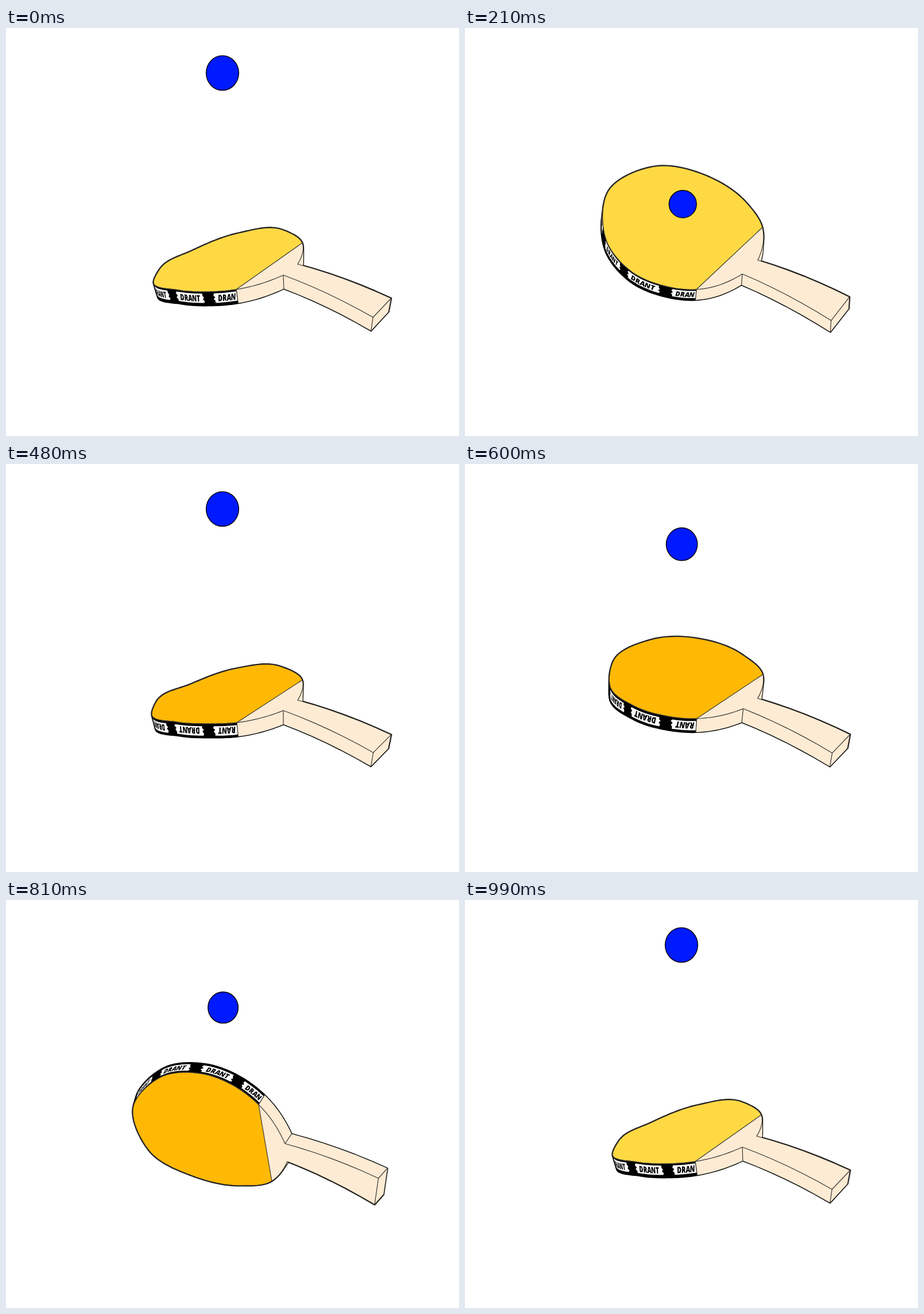
Write an HTML page that moves like this. It is 789 by 710 pixels and loops after 1020 ms.

```html
<!DOCTYPE html>
<html lang="en">
<head>
<meta charset="utf-8">
<title>Paddle flip</title>
<style>
  html, body { margin: 0; width: 100%; height: 100%; overflow: hidden; background: #fff; }
  svg { display: block; width: 100vw; height: 100vh; }
  text { font: italic 800 100px "Open Sans", "Noto Sans", sans-serif; text-anchor: middle; }
</style>
</head>
<body>
<svg id="stage" viewBox="0 0 789 710" stroke-linejoin="round" stroke-linecap="round"></svg>
<script>
const LOOP = 1020, STEP = 30;
const WOOD = '#fdebd4', YELLOW = '#ffd944', ORANGE = '#ffb905', INK = '#3b3630';
const WORD = 'DRANT';

// Each pose: time, turn in degrees, visible side (1 yellow, -1 orange),
// thickness at the tip, blade edge from neck A round the tip to neck B.
const poses = [
  { t: 0, turn: -14.6, side: 1, tip: [8, 24],
    edge: [483,430, 401,455, 352,459, 300,456, 257,444, 268,419, 325,387, 405,357, 481,351, 516,374, 508,411] },
  { t: 210, turn: -4.5, side: 1, tip: [-2, 17],
    edge: [483,428, 403,455, 352,450, 290,424, 247,372, 250,283, 330,241, 420,257, 492,306, 518,347, 510,404] },
  { t: 360, turn: 106.3, side: 1, tip: [5, -22],
    edge: [497,452, 481,470, 425,467, 340,453, 268,430, 226,383, 262,347, 322,345, 380,362, 423,386, 482,433] },
  { t: 480, turn: 163, side: -1, tip: [7, 24],
    edge: [508,411, 516,376, 477,352, 400,356, 322,383, 262,413, 254,437, 298,449, 352,452, 402,450, 483,429] },
  { t: 690, turn: 165.4, side: -1, tip: [-6, 23],
    edge: [511,405, 521,358, 488,314, 415,259, 325,239, 256,280, 254,350, 292,397, 350,427, 405,437, 486,423] },
  { t: 810, turn: 258, side: -1, tip: [5, -16],
    edge: [486,424, 440,356, 400,325, 345,303, 270,308, 222,358, 250,437, 325,480, 410,497, 463,489, 490,455] }
];
poses.push({ ...poses[0], t: 990, turn: 345.4 });

const rad = d => d * Math.PI / 180;
const mix = (a, b, wa, wb) => [a[0] * wa + b[0] * wb, a[1] * wa + b[1] * wb];
const lerp = (a, b, k) => mix(a, b, 1 - k, k);
const add = (a, b, k = 1) => mix(a, b, 1, k);
const sub = (a, b) => add(a, b, -1);
const cross = (a, b) => a[0] * b[1] - a[1] * b[0];

// Handle end: centre, sideways and downward directions
const END = [653, 498.5], ACROSS = [-15.65, 21.4], DOWN = [0, 18.2];
const endWidth = a => mix(ACROSS, DOWN, 2.05 * Math.cos(a), 2.05 * Math.sin(a));
const endDepth = a => mix(ACROSS, DOWN, -Math.sin(a), Math.cos(a));
const depthAt = (x, end, tip) => lerp(end, tip, (653 - x) / 420);

for (const p of poses) {
  p.a = rad(p.turn);
  p.tipDepth = p.tip.map(v => v * p.side);
  p.mid = [];
  for (let i = 0; i < p.edge.length; i += 2) {
    const q = [p.edge[i], p.edge[i + 1]];
    p.mid.push(add(q, depthAt(q[0], endDepth(p.a), p.tipDepth), p.side / 2));
  }
}

// Monotone cubic for the turn angle
const rate = i => (poses[i + 1].a - poses[i].a) / (poses[i + 1].t - poses[i].t);
const slope = i => {
  if (i === 0 || i === poses.length - 1) return 0;
  const a = rate(i - 1), b = rate(i);
  return 2 * a * b / (a + b);
};

function poseAt(t) {
  let i = 0;
  while (i < poses.length - 2 && t >= poses[i + 1].t) i++;
  const p = poses[i], q = poses[i + 1], h = q.t - p.t, s = Math.min(1, (t - p.t) / h);
  const a = p.a + (q.a - p.a) * s * s * (3 - 2 * s)
    + h * s * (1 - s) * (slope(i) * (1 - s) - slope(i + 1) * s);
  const d = q.a - p.a, k = (a - p.a) / d;
  const wa = Math.sin((1 - k) * d) / Math.sin(d), wb = Math.sin(k * d) / Math.sin(d);
  const half = (o, n) => mix(sub(o.mid[n], o.mid[10 - n]), [0, 0], .5, 0);
  const centre = (o, n) => lerp(o.mid[n], o.mid[10 - n], .5);
  const mid = p.mid.map((_, n) =>
    add(lerp(centre(p, n), centre(q, n), k), mix(half(p, n), half(q, n), wa, wb)));
  return { a, mid, tipDepth: mix(p.tipDepth, q.tipDepth, wa, wb) };
}

// Smooth curve through points, by index
function spline(pts) {
  const n = pts.length - 1, h = [], d = [], m = [];
  for (let i = 0; i < n; i++) {
    const v = sub(pts[i + 1], pts[i]);
    h[i] = Math.hypot(...v) || 1e-6;
    d[i] = v.map(c => c / h[i]);
  }
  for (let i = 1; i < n; i++) {
    const w = h[i] / (h[i - 1] + h[i]);
    m[i] = mix(d[i - 1], d[i], w, 1 - w);
  }
  m[0] = mix(d[0], m[1], 2, -1);
  m[n] = mix(d[n - 1], m[n - 1], 2, -1);
  return u => {
    const i = Math.max(0, Math.min(n - 1, Math.floor(u))), s = u - i, r = 1 - s;
    const base = mix(pts[i], pts[i + 1], r * r * (1 + 2 * s), s * s * (3 - 2 * s));
    return add(base, mix(m[i], m[i + 1], h[i] * s * r * r, -h[i] * s * s * r));
  };
}

const svg = document.getElementById('stage');
function make(tag, attrs) {
  const e = document.createElementNS('http://www.w3.org/2000/svg', tag);
  for (const k in attrs) e.setAttribute(k, attrs[k]);
  return svg.appendChild(e);
}
const thin = { fill: 'none', stroke: INK, 'stroke-width': 1.2 };
const outline = make('path', { fill: '#000', stroke: '#000', 'stroke-width': 3.2 });
const rimWood = make('path', { fill: WOOD, stroke: WOOD, 'stroke-width': .4 });
const rimTape = make('path', { fill: '#000', stroke: '#000', 'stroke-width': .4 });

// Labels along the tape: 0 at one end, 8 at the other, mirrored about the tip
const spans = [[-.25, .85], [1.17, 2.13], [2.35, 3.07], [3.3, 3.85]];
const labels = [...spans, ...spans.map(([a, b]) => [8 - b, 8 - a])].map(([lo, hi]) => ({
  lo, hi,
  patch: make('path', { fill: '#fff' }),
  letters: [...WORD].map(c => {
    const e = make('text', {});
    e.textContent = c;
    return e;
  })
}));
const corners = make('path', thin);
const face = make('path', { fill: WOOD });
const rubber = make('path', thin);
const rim = make('path', thin);
const ball = make('ellipse', { fill: '#001aff', stroke: '#000', 'stroke-width': 1.4 });

const pt = p => p[0].toFixed(2) + ' ' + p[1].toFixed(2);
const poly = pts => 'M' + pts.map(pt).join('L') + 'Z';
const show = (e, on) => e.setAttribute('visibility', on ? 'visible' : 'hidden');

function handle(from, to) {
  const c = add(lerp(from, to, .5), [0, -8]);
  return [0, 1, 2, 3, 4, 5].map(i => lerp(lerp(from, c, i / 6), lerp(c, to, i / 6), i / 6));
}

function drawPaddle(t) {
  const { a, mid, tipDepth } = poseAt(t);
  const end = endDepth(a), width = endWidth(a);
  const depth = p => depthAt(p[0], end, tipDepth);
  const curve = spline(mid);
  const endA = add(END, width, .5), endB = add(END, width, -.5);

  const PER = 12, blade = [];
  for (let i = 0; i < 10 * PER; i++) blade.push(curve(i / PER));
  const ring = [...handle(endA, mid[0]), ...blade, ...handle(mid[10], endB), endB];
  const n = ring.length, next = i => (i + 1) % n;
  const first = 6 + PER, last = 6 + 9 * PER;

  const area = ring.reduce((s, p, i) => s + cross(p, ring[next(i)]), 0);
  const side = area > 0 ? 1 : -1;
  const front = ring.map(p => add(p, depth(p), -side / 2));
  const back = ring.map(p => add(p, depth(p), side / 2));
  // The rim shows where its depth points away from the face
  const faces = (along, p) => cross(depth(p), along) > 0;

  let woodPath = '', tapePath = '', lines = '';
  const seen = ring.map((p, i) => {
    const j = next(i);
    if (!faces(sub(front[j], front[i]), p)) return false;
    const quad = poly([front[i], front[j], back[j], back[i]]);
    if (i >= first && i < last) tapePath += quad;
    else woodPath += quad;
    return true;
  });
  for (const i of [0, 6, first, last, 6 + 10 * PER, n - 1])
    if (seen[i] || seen[(i + n - 1) % n]) lines += 'M' + pt(front[i]) + 'L' + pt(back[i]);

  const whole = poly(front);
  outline.setAttribute('d', whole + woodPath + tapePath);
  rimWood.setAttribute('d', woodPath);
  rimTape.setAttribute('d', tapePath);
  corners.setAttribute('d', lines);
  face.setAttribute('d', whole);
  rubber.setAttribute('d', poly(front.slice(first, last + 1)));
  rubber.setAttribute('fill', side > 0 ? YELLOW : ORANGE);
  rim.setAttribute('d', whole);

  const tape = (u, v) => {
    const p = curve(1 + Math.max(0, Math.min(8, u)));
    return add(p, depth(p), v - .5);
  };
  const tapeSeen = u => {
    const v = side > 0 ? 0 : 1;
    return faces(sub(tape(u + .04, v), tape(u - .04, v)), tape(u, .5));
  };
  for (const { lo, hi, patch, letters } of labels) {
    const len = hi - lo, shape = [];
    for (let i = 0; i <= 8; i++) shape.push(tape(lo + len * (.04 + .92 * i / 8), .13));
    for (const [x, v] of [[.99, .28], [.94, .42], [1, .55], [.95, .68]]) shape.push(tape(lo + len * x, v));
    for (let i = 8; i >= 0; i--) shape.push(tape(lo + len * (.04 + .92 * i / 8), .82));
    for (const [x, v] of [[0, .7], [.06, .56], [.01, .44], [.05, .28]]) shape.push(tape(lo + len * x, v));
    patch.setAttribute('d', poly(shape));
    show(patch, tapeSeen((lo + hi) / 2));

    letters.forEach((e, i) => {
      const w = len * .144, u = hi - len * .14 - w * (i + .5);
      const on = u > .03 && u < 7.97 && tapeSeen(u);
      show(e, on);
      if (!on) return;
      const x = sub(tape(u - w / 2, .5), tape(u + w / 2, .5)).map(c => c / 68);
      const o = tape(u, .72), y = depth(o).map(c => c * .46 / 71);
      e.setAttribute('transform', `matrix(${[...x, ...y, ...o].map(c => c.toFixed(4)).join(' ')})`);
    });
  }
}

// Two bounces: start, contact, end and drop height
const bounces = [[0, 240, 480, 298], [480, 720, 990, 245]];
function drawBall(t) {
  const [start, hit, stop, drop] = bounces[t < 480 ? 0 : 1];
  const k = t < hit ? (t - start) / (hit - start) : (stop - t) / (stop - hit);
  const fall = drop * k * k;
  ball.setAttribute('cx', 377 + fall * .01);
  ball.setAttribute('cy', 78.3 + fall);
  ball.setAttribute('rx', 28.4 - fall * .0195);
  ball.setAttribute('ry', 30.2 - fall * .0275);
}

function draw(now) {
  const t = Math.floor(now % LOOP / STEP) * STEP;
  drawPaddle(t);
  drawBall(t);
}
function tick(now) {
  draw(now);
  requestAnimationFrame(tick);
}
draw(0);
requestAnimationFrame(tick);
</script>
</body>
</html>
```
